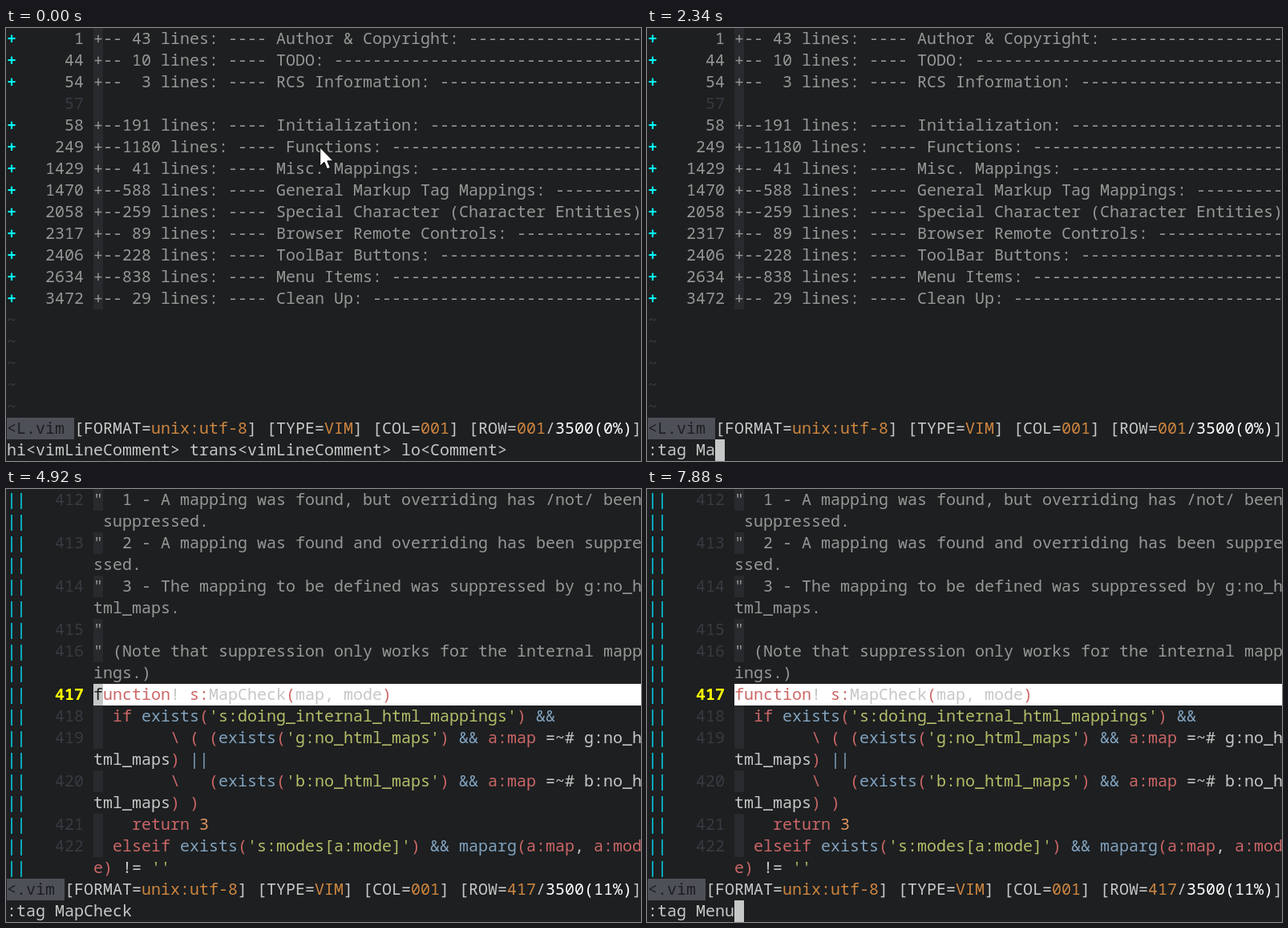
Write an HTML page that moves like this. It is 792 px wide and 540 px high and loops after 8000 ms.

```html
<!DOCTYPE html>
<html lang="en">
<head>
<meta charset="utf-8">
<title>Folded editor, tag jump</title>
<style>
html, body { margin: 0; width: 100%; height: 100%; overflow: hidden; background: #1d1f21; }
#stage {
  position: relative; width: 792px; height: 540px; overflow: hidden;
  background: #1d1f21; color: #c5c8c6;
  font: 20px/25px "Noto Sans Mono", "DejaVu Sans Mono", monospace;
  font-variant-ligatures: none;
}
.screen { position: absolute; inset: 0; }
.row, .box { position: absolute; height: 27px; white-space: pre; }
.row { left: 1px; }
.c { color: #00ffff; font-weight: bold; }
.b { color: #00dcf5; }
.n { color: #373b41; }
.y { color: #ffff00; font-weight: bold; }
.g { color: #969896; }
.r { color: #cc6666; }
.s { color: #b5bd68; }
.u { color: #81a2be; }
.o { color: #de935f; }
.p { color: #cd853f; }
.w { color: #ffffff; }
.d { color: #1d1f21; }
#cursor { width: 12px; background: #c5c8c6; color: #1d1f21; }
#mouse { position: absolute; left: 389px; top: 147px; }
</style>
</head>
<body>
<div id="stage">
  <div class="screen" id="folds"></div>
  <div class="screen" id="code"></div>
  <div class="row" id="cmd" style="top:513px"></div>
  <div class="box" id="cursor"></div>
  <svg id="mouse" width="24" height="34" viewBox="-1.4 -1.4 16.8 23.8">
    <path d="M.5 0V16.2L4.2 12.8L6.7 18.8L9.4 17.6L6.9 11.8H12Z" fill="#fff" stroke="#000" stroke-width=".7"/>
  </svg>
</div>
<script>
const CELL = 12, LINE = 27, TEXT_COL = 9, WIDTH = 57, LOOP = 8000;
const $ = id => document.getElementById(id);

function add(parent, className, text = '') {
  const el = document.createElement('div');
  el.className = className;
  el.textContent = text;
  return parent.appendChild(el);
}

function place(el, col, row) {
  el.style.left = 1 + col * CELL + 'px';
  el.style.top = row * LINE + 'px';
}

function box(parent, col, row, cols, color) {
  const el = add(parent, 'box');
  place(el, col, row);
  el.style.width = cols * CELL + 'px';
  el.style.background = color;
}

// "{r text}" gives text the colour class r
function write(parent, row, markup) {
  const el = add(parent, 'row');
  el.style.top = row * LINE + 'px';
  for (const [all, cls, text] of markup.matchAll(/\{(\w) ([^}]*)\}|[^{]+/g)) {
    const span = document.createElement('span');
    span.className = cls || '';
    span.textContent = cls ? text : all;
    el.append(span);
  }
}

function status(parent, name, row, percent) {
  box(parent, 0, 18, name.length, '#4d5057');
  write(parent, 18, `{d ${name}}[FORMAT={p unix:utf-8}] [TYPE={p VIM}] [COL={p 001}] ` +
    `[ROW={p ${row}}/{w 3500(${percent}%)}]`);
}

const folds = [
  [1, 43, 'Author & Copyright:'],
  [44, 10, 'TODO:'],
  [54, 3, 'RCS Information:'],
  [57],
  [58, 191, 'Initialization:'],
  [249, 1180, 'Functions:'],
  [1429, 41, 'Misc. Mappings:'],
  [1470, 588, 'General Markup Tag Mappings:'],
  [2058, 259, 'Special Character (Character Entities)'],
  [2317, 89, 'Browser Remote Controls:'],
  [2406, 228, 'ToolBar Buttons:'],
  [2634, 838, 'Menu Items:'],
  [3472, 29, 'Clean Up:']
];

folds.forEach(([num, count, title], row) => {
  box($('folds'), TEXT_COL, row, 1, '#282a2e');
  const label = String(num).padStart(7);
  if (!title) return write($('folds'), row, `{n  ${label}}`);
  const text = `+--${String(count).padStart(3)} lines: ---- ${title} `.padEnd(WIDTH, '-');
  write($('folds'), row, `{c +}{g ${label} ${text}}`);
});
for (let row = 13; row < 18; row++) write($('folds'), row, '{n ~}');
status($('folds'), '<L.vim ', '001', 0);

const test = v => `{r (}{u exists}{r (}{s '${v}:no_html_maps'}{r )} {u &&} {r a:map} =~# ${v}:no_h`;
const code = [
  [412, '{g "  1 - A mapping was found, but overriding has /not/ been}'],
  ['', '{g  suppressed.}'],
  [413, '{g "  2 - A mapping was found and overriding has been suppre}'],
  ['', '{g ssed.}'],
  [414, '{g "  3 - The mapping to be defined was suppressed by g:no_h}'],
  ['', '{g tml_maps.}'],
  [415, '{g "}'],
  [416, '{g " (Note that suppression only works for the internal mapp}'],
  ['', '{g ings.)}'],
  [417, '{r function}! {r s:}MapCheck{r (}map, mode{r )}'],
  [418, "  {r if} {u exists}{r (}{s 's:doing_internal_html_mappings'}{r )} {u &&}"],
  [419, '        {r \\ (} ' + test('g')],
  ['', 'tml_maps{r )} {u ||}'],
  [420, '        {r \\}   ' + test('b')],
  ['', 'tml_maps{r ) )}'],
  [421, '    {r return} {o 3}'],
  [422, "  {r elseif} {u exists}{r (}{s 's:modes[a:mode]'}{r )} {u &&} {u maparg}{r (a:map}, {r a:mod}"],
  ['', "{r e)} != {s ''}"]
];

code.forEach(([num, text], row) => {
  const current = num === 417;
  if (current) box($('code'), TEXT_COL, row, WIDTH, '#ffffff');
  else if (num) box($('code'), TEXT_COL, row, 1, '#282a2e');
  write($('code'), row, `{b ||}{${current ? 'y' : 'n'} ${String(num).padStart(6)}} ${text}`);
});
status($('code'), '<.vim ', '417', 11);

// [start ms, command line, cursor]: "cmd" follows the typing, "text" sits in the buffer
const message = 'hi<vimLineComment> trans<vimLineComment> lo<Comment>';
const steps = [
  [0, message], [230, message, 'text'], [380, ':'], [480, ':', 'cmd'],
  [850, ':t', 'cmd'], [1080, ':ta', 'cmd'], [1250, ':tag', 'cmd'], [1390, ':tag ', 'cmd'],
  [1940, ':tag M', 'cmd'], [2340, ':tag Ma', 'cmd'], [2490, ':tag Map', 'cmd'],
  [2810, ':tag MapCheck', 'cmd'], [3510, ':tag MapCheck'],
  [3740, ':tag MapCheck', 'text'], [4440, ':tag MapCheck'],
  [4920, ':tag MapCheck', 'text'], [5230, ':tag MapCheck'], [5340, ':'], [5460, ':', 'cmd'],
  [5860, ':t', 'cmd'], [6080, ':ta', 'cmd'], [6290, ':tag', 'cmd'], [6500, ':tag ', 'cmd'],
  [6790, ':tag M', 'cmd'], [7420, ':tag Me', 'cmd'], [7650, ':tag Men', 'cmd'],
  [7880, ':tag Menu', 'cmd']
];

function show(t) {
  const [, text, cursor] = steps.findLast(([start]) => start <= t);
  const jumped = t >= 3740;
  $('folds').hidden = jumped;
  $('code').hidden = !jumped;
  $('cmd').textContent = text;
  $('mouse').style.display = t < 380 ? '' : 'none';
  $('cursor').hidden = !cursor;
  const inText = cursor === 'text';
  $('cursor').textContent = inText ? (jumped ? 'f' : '+') : '';
  if (inText) place($('cursor'), TEXT_COL, jumped ? 9 : 0);
  else place($('cursor'), text.length, 19);
}

const begin = performance.now();
function tick() {
  show((performance.now() - begin) % LOOP);
  requestAnimationFrame(tick);
}
tick();
</script>
</body>
</html>
```
